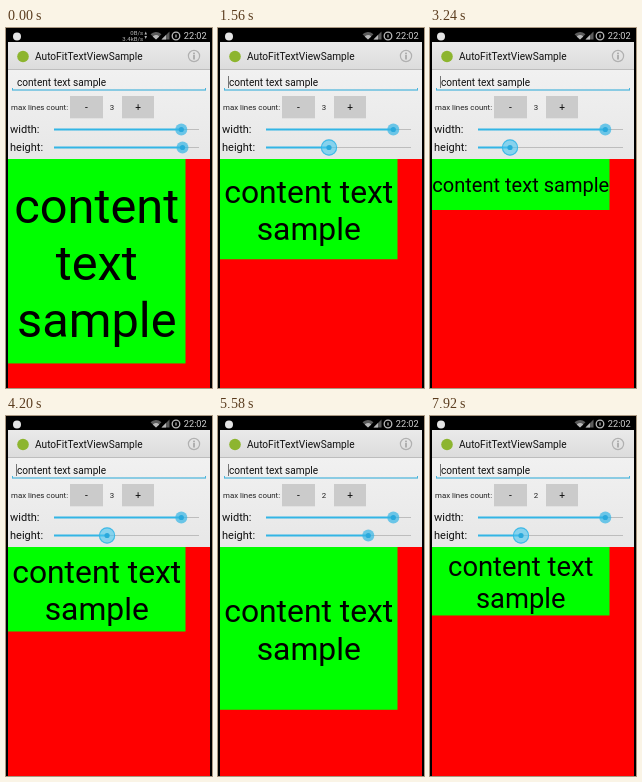
These frames come from a looping animation (206 px wide and 360 px high, 8 s). An HTML page with a canvas:

```html
<!DOCTYPE html>
<html lang="en">
<head>
<meta charset="utf-8">
<title>Auto-fit text</title>
<style>
  html, body { margin: 0; width: 100%; height: 100%; overflow: hidden; background: #000; }
  canvas { display: block; width: 206px; height: 360px; }
</style>
</head>
<body>
<canvas id="stage"></canvas>
<script>
const W = 206, H = 360, LOOP = 8000;
const LEFT = 2, RIGHT = 204, BOX_RIGHT = 179.5, BOX_TOP = 131;
const BLUE = '#33b5e5';
const FONT = 'Roboto, "Noto Sans", sans-serif';
const SAMPLE = 'content text sample';

// Ways to break the sample; a wrapped line keeps its trailing space when measured
const BREAKS = [
  [SAMPLE],
  ['content text ', 'sample'],
  ['content ', 'text ', 'sample']
];

// Height slider: time in ms, thumb x
const DRAG = [
  [0, 176.5], [500, 176.5], [840, 170], [1560, 111], [2520, 96], [3240, 80],
  [3500, 80], [4200, 101], [5000, 150.3], [5850, 150.3], [6840, 114], [7920, 91], [8000, 90]
];

const canvas = document.getElementById('stage');
const ctx = canvas.getContext('2d');
const ratio = window.devicePixelRatio || 1;
canvas.width = W * ratio;
canvas.height = H * ratio;

function track(keys, t) {
  const i = Math.max(1, keys.findIndex(k => k[0] >= t));
  const [t0, a] = keys[i - 1], [t1, b] = keys[i];
  return a + (b - a) * (t - t0) / (t1 - t0);
}

function rect(x, y, w, h, fill) {
  ctx.fillStyle = fill;
  ctx.fillRect(x, y, w, h);
}

function shade(y0, y1, top, bottom) {
  const g = ctx.createLinearGradient(0, y0, 0, y1);
  g.addColorStop(0, top);
  g.addColorStop(1, bottom);
  rect(LEFT, y0, RIGHT - LEFT, y1 - y0, g);
}

function disc(x, y, r, fill) {
  ctx.fillStyle = fill;
  ctx.beginPath();
  ctx.arc(x, y, r, 0, Math.PI * 2);
  ctx.fill();
}

function ring(x, y, r, stroke, width) {
  ctx.strokeStyle = stroke;
  ctx.lineWidth = width;
  ctx.beginPath();
  ctx.arc(x, y, r, 0, Math.PI * 2);
  ctx.stroke();
}

function poly(points, fill) {
  ctx.fillStyle = fill;
  ctx.beginPath();
  points.forEach(([x, y]) => ctx.lineTo(x, y));
  ctx.fill();
}

function text(str, x, y, size, fill = '#111', align = 'left') {
  ctx.font = `${size}px ${FONT}`;
  ctx.textAlign = align;
  ctx.fillStyle = fill;
  ctx.fillText(str, x, y);
}

function wifi(x, y, r, fill) {
  ctx.fillStyle = fill;
  ctx.beginPath();
  ctx.moveTo(x, y);
  ctx.arc(x, y, r, -Math.PI * 0.76, -Math.PI * 0.24);
  ctx.fill();
}

function statusBar(t) {
  const light = '#b8b8b8', dim = '#5c5c5c';
  disc(11, 8.5, 4, '#e4e4e4');
  if (t < 700) {
    text('0B/s', 137, 6.5, 6, light, 'right');
    text('3.4kB/s', 137, 13, 6, light, 'right');
    poly([[138.5, 8], [139.7, 11], [141, 8]], light);
    poly([[138.5, 6.5], [139.7, 3.5], [141, 6.5]], light);
  }
  wifi(150, 11.5, 7.5, dim);
  wifi(150, 11.5, 4.5, light);
  poly([[155.5, 11.5], [163.5, 11.5], [163.5, 3.5]], dim);
  poly([[155.5, 11.5], [160, 11.5], [160, 7]], light);
  ring(170, 8, 3.8, light, 1.3);
  rect(169.4, 6.5, 1.2, 3, light);
  text('22:02', 177.8, 11.3, 9.2, '#d0d0d0');
}

function actionBar() {
  shade(14, 42, '#eaeaea', '#dcdcdc');
  rect(LEFT, 41, RIGHT - LEFT, 1, '#bdbdbd');
  disc(17, 28.5, 5.8, '#8db52f');
  text('AutoFitTextViewSample', 29, 31.7, 10.15);
  ring(188, 28, 5.6, '#b0b0b0', 1.2);
  rect(187.1, 24.6, 1.8, 1.7, '#aaa');
  rect(187.1, 27, 1.8, 4.5, '#aaa');
}

function editField(t) {
  text(SAMPLE, 11, 58, 10.1);
  rect(6, 61.4, 194, 1.2, '#4ab5dd');
  rect(6, 60, 1, 2, '#4ab5dd');
  rect(199, 60, 1, 2, '#4ab5dd');
  const blink = (t + 516) % 936;
  if (blink < 490) rect(10.2, 48, 0.8, 12, '#555');
}

function button(x, w, label) {
  rect(x, 68, w, 22.3, '#cbcbcb');
  text(label, x + w / 2, 83, 10.1, '#111', 'center');
}

function slider(label, x, y, pressed) {
  text(label, 4, y + 3.5, 11);
  rect(48, y - 0.5, 145, 1, '#bdbdbd');
  rect(48, y - 1, x - 48, 2, BLUE);
  if (pressed) {
    disc(x, y, 8, 'rgba(70,195,240,0.6)');
    ring(x, y, 7.6, 'rgba(51,181,229,0.85)', 1.1);
  } else {
    disc(x, y, 6, 'rgba(51,181,229,0.7)');
  }
  disc(x, y, 2.6, '#2aa9dc');
}

// Picks the largest text that fits, favouring fewer lines on a near tie
function fit(height, maxLines) {
  ctx.font = `100px ${FONT}`;
  let best = { size: 0 };
  for (const lines of BREAKS.slice(0, maxLines)) {
    const widest = Math.max(...lines.map(s => ctx.measureText(s).width)) / 100;
    const tall = lines.length * 1.172 + 0.155;
    const size = Math.min(177 / widest, height / tall);
    if (size > best.size * 1.03) best = { size, lines, tall };
  }
  return best;
}

function fittedBox(height, maxLines) {
  rect(LEFT, BOX_TOP, RIGHT - LEFT, H - BOX_TOP, '#f00');
  rect(LEFT, BOX_TOP, BOX_RIGHT - LEFT, height, '#0f0');
  const { size, lines, tall } = fit(height, maxLines);
  const first = BOX_TOP + (height - tall * size) / 2 + 1.056 * size;
  lines.forEach((line, i) =>
    text(line.trim(), (LEFT + BOX_RIGHT) / 2, first + i * 1.172 * size, size, '#000', 'center'));
}

function draw(t) {
  const thumb = track(DRAG, t);
  const pressed = (t > 400 && t < 5100) || t > 5850;
  const maxLines = t < 5340 ? 3 : 2;

  ctx.setTransform(ratio, 0, 0, ratio, 0, 0);
  rect(0, 0, W, H, '#000');
  statusBar(t);
  actionBar();
  shade(42, BOX_TOP, '#f1f1f1', '#e7e7e7');
  editField(t);
  text('max lines count:', 5, 82, 7.86, '#222');
  button(64, 33, '-');
  text(String(maxLines), 106, 82, 7.86, '#222', 'center');
  button(116, 32, '+');
  slider('width:', 175.3, 101.5, false);
  slider('height:', thumb, 119.5, pressed);
  fittedBox(51 + (thumb - 80) * 1.59, maxLines);
}

function frame() {
  draw(performance.now() % LOOP);
  requestAnimationFrame(frame);
}
frame();
</script>
</body>
</html>
```
